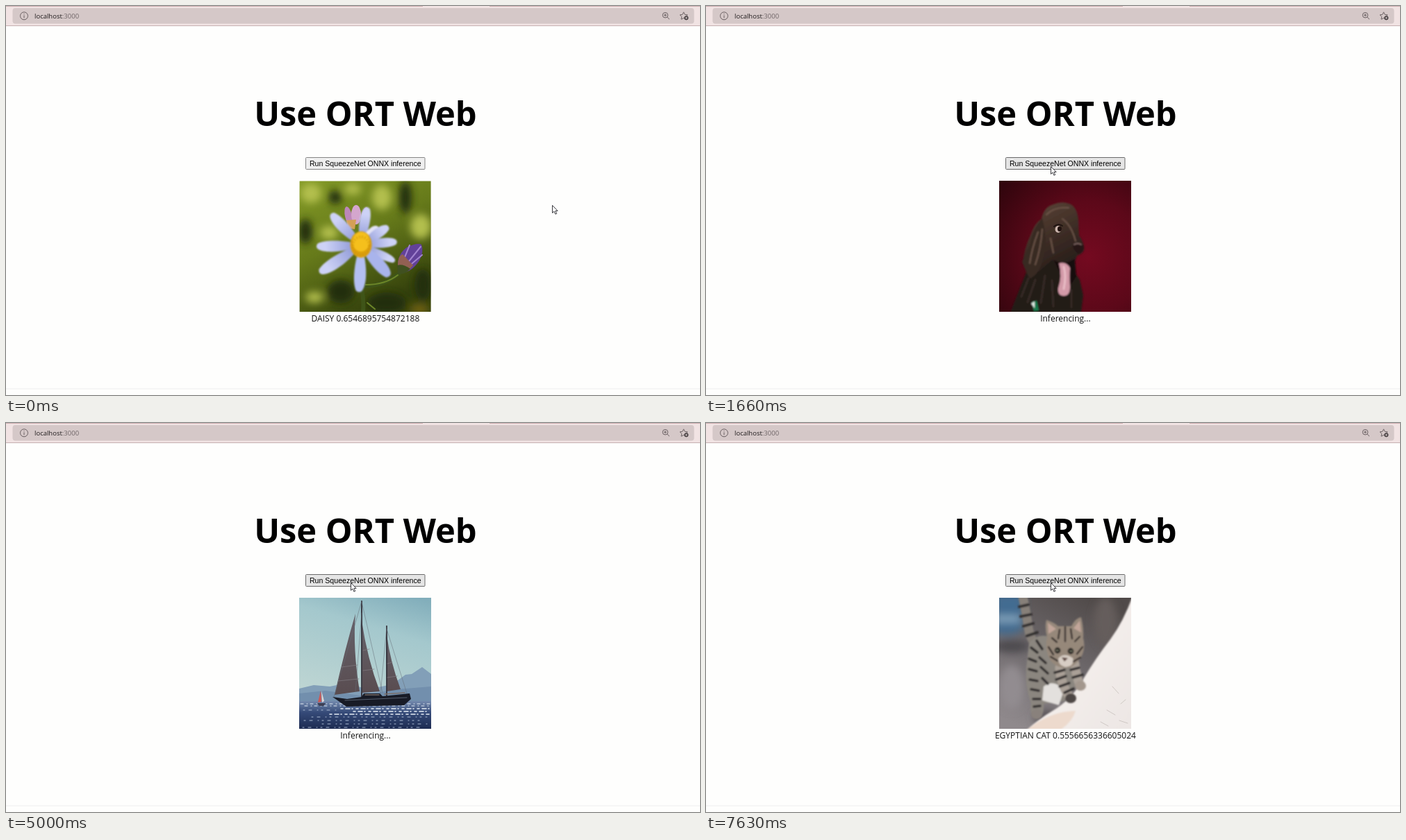
Recreate the animation shown at these times as an HTML page. Size 999 by 561 pixels, loop 8 s.

```html
<!DOCTYPE html>
<html lang="en">
<head>
<meta charset="utf-8">
<title>Use ORT Web</title>
<style>
html, body { margin: 0; width: 100%; height: 100%; overflow: hidden; background: #fefefd; }
svg { display: block; }
#stage { width: 100%; height: 100%; }
text { font-family: "Open Sans", "Noto Sans", sans-serif; }
.mid { text-anchor: middle; }
.address { font-size: 9.5px; fill: #201c1d; }
.port { fill: #6d6365; }
.icon { fill: none; stroke: #6b6163; stroke-width: 1; }
.title { font-size: 48.8px; font-weight: 700; }
.label { font: 10.6px "Liberation Sans", Arial, sans-serif; }
.status text { font-size: 12px; fill: #111; }

/* one 8 s clock for everything */
.button, .status text, .photo, .cursor { animation: 8s step-end infinite; }
.status text, .photo { opacity: 0; }

.button { animation-name: button; }
@keyframes button {
  0%, 100% { fill: #efefef; stroke: #858585; }
  4.96%, 12.5%, 62.5%, 87% { fill: #e5e5e5; stroke: #6a6a6a; }
  11.25%, 62%, 86.25% { fill: #f5f5f5; stroke: #8d8d8d; }
}

.cursor { animation-name: cursor; }
@keyframes cursor {
  0% { transform: translate(786px, 287px); }
  1.3% { transform: translate(786px, 287px); animation-timing-function: cubic-bezier(.35, .2, .4, 1); }
  5.375% { transform: translate(496px, 231px); }
  41.25%, 100% { transform: translate(496px, 230px); }
}

/* photos stack up, each covering the one before */
.photo.daisy { opacity: 1; animation: none; }
.photo.dog { animation-name: show-dog; }
.photo.boat { animation-name: show-boat; }
.photo.cello { animation-name: show-cello; }
.photo.cat { animation-name: show-cat; }
@keyframes show-dog { 0% { opacity: 0; } 20.75%, 100% { opacity: 1; } }
@keyframes show-boat { 0% { opacity: 0; } 45.75%, 100% { opacity: 1; } }
@keyframes show-cello { 0% { opacity: 0; } 69.125%, 100% { opacity: 1; } }
@keyframes show-cat { 0% { opacity: 0; } 89.125%, 100% { opacity: 1; } }

.status .busy { animation-name: say-busy; }
.status .daisy { animation-name: say-daisy; }
.status .dog { animation-name: say-dog; }
.status .boat { animation-name: say-boat; }
.status .cello { animation-name: say-cello; }
.status .cat { animation-name: say-cat; }
@keyframes say-busy {
  0%, 29.5%, 52.5%, 75.75%, 95.375%, 100% { opacity: 0; }
  12.5%, 42%, 62.5%, 87% { opacity: 1; }
}
@keyframes say-daisy { 0% { opacity: 1; } 12.5%, 100% { opacity: 0; } }
@keyframes say-dog { 0%, 42%, 100% { opacity: 0; } 29.5% { opacity: 1; } }
@keyframes say-boat { 0%, 62.5%, 100% { opacity: 0; } 52.5% { opacity: 1; } }
@keyframes say-cello { 0%, 87%, 100% { opacity: 0; } 75.75% { opacity: 1; } }
@keyframes say-cat { 0% { opacity: 0; } 95.375%, 100% { opacity: 1; } }

.line { fill: none; stroke-linecap: round; stroke-linejoin: round; }
</style>
</head>
<body>
<svg id="stage" viewBox="0 0 999 561">
  <defs>
    <filter id="soft"><feGaussianBlur stdDeviation="6"/></filter>
    <filter id="fuzz"><feGaussianBlur stdDeviation=".9"/></filter>
    <path id="petal" d="M0 0C14-7 40-10 49-3Q52 0 49 4C40 9 14 7 0 0"/>
    <linearGradient id="meadow" x1="0" y1="0" x2=".5" y2="1">
      <stop offset="0" stop-color="#839a26"/><stop offset=".5" stop-color="#667a1a"/><stop offset="1" stop-color="#35420c"/>
    </linearGradient>
    <linearGradient id="petals" x1="0" y1="0" x2="1" y2="0">
      <stop offset=".25" stop-color="#9aa3dc"/><stop offset=".8" stop-color="#cdd2f6"/>
    </linearGradient>
    <radialGradient id="wine" cx=".68" cy=".58" r=".85">
      <stop offset="0" stop-color="#740a20"/><stop offset=".5" stop-color="#5c0819"/><stop offset="1" stop-color="#31050d"/>
    </radialGradient>
    <linearGradient id="fur" x1="0" y1="0" x2=".4" y2="1">
      <stop offset="0" stop-color="#5f4638"/><stop offset=".5" stop-color="#402f27"/><stop offset="1" stop-color="#241b18"/>
    </linearGradient>
    <linearGradient id="sky" x1=".9" y1="0" x2=".6" y2="1">
      <stop offset="0" stop-color="#82aebb"/><stop offset=".3" stop-color="#a4c8cd"/><stop offset="1" stop-color="#c3d8d4"/>
    </linearGradient>
    <linearGradient id="sea" x1="0" y1="0" x2="0" y2="1">
      <stop offset="0" stop-color="#7389ad"/><stop offset=".4" stop-color="#354a78"/><stop offset="1" stop-color="#1c2a50"/>
    </linearGradient>
    <linearGradient id="sail" x1="0" y1="0" x2="0" y2="1">
      <stop offset="0" stop-color="#66636b"/><stop offset="1" stop-color="#594c50"/>
    </linearGradient>
    <radialGradient id="wood" cx=".4" cy=".35" r=".7">
      <stop offset="0" stop-color="#c2622a"/><stop offset=".6" stop-color="#a0441a"/><stop offset="1" stop-color="#622207"/>
    </radialGradient>
    <linearGradient id="yard" x1=".7" y1="0" x2=".2" y2="1">
      <stop offset="0" stop-color="#504a49"/><stop offset=".5" stop-color="#6f6a6d"/><stop offset="1" stop-color="#8f898c"/>
    </linearGradient>
    <linearGradient id="log" x1="0" y1="0" x2="1" y2="1">
      <stop offset="0" stop-color="#e6dbd5"/><stop offset=".5" stop-color="#f4eeeb"/><stop offset="1" stop-color="#ece6e4"/>
    </linearGradient>
  </defs>

  <rect width="999" height="561" fill="#fefefd"/>
  <rect width="999" height="28" fill="#f1e3e3"/>
  <path d="M0 .5H600M696 .5H999" stroke="#cfaeb0"/>
  <rect x="9.5" y="3" width="981" height="22.5" rx="4" fill="#d5c8c8"/>
  <path d="M0 28.5H999" stroke="#c5b0b1"/>
  <path d="M0 552H999" stroke="#eeeeee"/>

  <g class="icon">
    <circle cx="26" cy="14.3" r="5.5"/>
    <path d="M26 13.3V17.3M26 11V12"/>
    <circle cx="949" cy="13.2" r="3.8"/>
    <path d="M951.8 16L955 19.2M947 13.2H951M949 11.2V15.2"/>
    <path d="M975.5 8.8L977.2 12.3L981 12.8L978.3 15.6L978.9 19L975.5 17.4L972 19.2L972.7 15.4L970 12.8L973.8 12.3Z"/>
    <circle cx="979.3" cy="17.2" r="2.7" fill="#4f4749" stroke="#4f4749"/>
    <path d="M977.8 17.2H980.8M979.3 15.7V18.7" stroke="#e4dada" stroke-width=".8"/>
  </g>
  <text class="address" x="41" y="17.6">localhost<tspan class="port">:3000</tspan></text>

  <text class="title mid" x="517.4" y="172.5">Use ORT Web</text>
  <rect class="button" x="431.5" y="218.5" width="171.5" height="17" rx="1"/>
  <text class="label mid" x="517.3" y="230.6">Run SqueezeNet ONNX inference</text>

  <svg x="422.6" y="252.4" width="189" height="188.6" viewBox="422.6 252.4 189 188.6">
    <g class="photo daisy">
      <rect x="422" y="252" width="190" height="190" fill="url(#meadow)"/>
      <g filter="url(#soft)">
        <g fill="#b3bf4d">
          <ellipse cx="439" cy="270" rx="15" ry="14"/><ellipse cx="465" cy="327" rx="13" ry="10"/>
          <ellipse cx="541" cy="276" rx="14" ry="18"/><ellipse cx="597" cy="318" rx="15" ry="18"/>
          <ellipse cx="444" cy="420" rx="13" ry="8"/><ellipse cx="499" cy="264" rx="12" ry="8"/>
        </g>
        <g fill="#222d0a">
          <ellipse cx="431" cy="325" rx="10" ry="18"/><ellipse cx="575" cy="276" rx="9" ry="24"/>
          <ellipse cx="482" cy="412" rx="20" ry="17"/><ellipse cx="548" cy="428" rx="28" ry="15"/>
          <ellipse cx="600" cy="402" rx="12" ry="23"/><ellipse cx="474" cy="276" rx="10" ry="10"/>
        </g>
        <ellipse cx="595" cy="437" rx="14" ry="6" fill="#7d6818"/>
      </g>
      <path class="line" d="M507 391Q516 414 514 441M515 404Q550 404 575 377" stroke="#3f5418" stroke-width="6"/>
      <path class="line" d="M518 402Q546 402 564 388M520 428L531 437" stroke="#6c8628" stroke-width="2"/>
      <g fill="#bd87ba">
        <ellipse cx="493" cy="303" rx="5" ry="14" transform="rotate(-12 493 303)"/>
        <ellipse cx="504" cy="301" rx="7" ry="14" fill="#d4a6cd"/>
        <ellipse cx="516" cy="304" rx="5" ry="14" transform="rotate(12 516 304)"/>
        <path d="M490 309L504 308L502 322L492 320Z" fill="#d5a056"/>
      </g>
      <g fill="#624199">
        <path d="M564 375Q564 357 577 348Q592 341 598 344Q602 354 595 367Q584 384 569 385Z"/>
        <path d="M570 372L581 345M576 373L597 347M579 376L599 359" stroke="#a283cf" stroke-width="2" class="line"/>
        <path d="M564 374Q564 360 571 358L586 374Q575 388 565 385Z" fill="#926053"/>
        <path d="M563 374Q571 371 582 379Q574 388 564 386Z" fill="#405020"/>
      </g>
      <g fill="url(#petals)" filter="url(#fuzz)">
        <use href="#petal" transform="translate(511 345) rotate(226) scale(1.24 1.15)"/>
        <use href="#petal" transform="translate(511 345) rotate(-81) scale(1.1 1.1)"/>
        <use href="#petal" transform="translate(511 345) rotate(-48) scale(.72 1)" fill="#e3e3f4"/>
        <use href="#petal" transform="translate(511 345) rotate(-35) scale(.95 1.05)"/>
        <use href="#petal" transform="translate(511 345) rotate(-6) scale(1.03 1)"/>
        <use href="#petal" transform="translate(511 345) rotate(25) scale(1.07 .85)"/>
        <use href="#petal" transform="translate(511 345) rotate(47) scale(1.2 1.25)" fill="#a9b4ec"/>
        <use href="#petal" transform="translate(511 345) rotate(92) scale(1.34 1.25)" fill="#b3bff2"/>
        <use href="#petal" transform="translate(511 345) rotate(146) scale(1.42 1.25)"/>
        <use href="#petal" transform="translate(511 345) rotate(178) scale(1.27 1.15)"/>
      </g>
      <g filter="url(#fuzz)">
        <ellipse cx="511" cy="344" rx="15.5" ry="19" fill="#dda00d"/>
        <ellipse cx="511" cy="340" rx="12" ry="14" fill="#f5c01a"/>
        <ellipse cx="511" cy="346" rx="12" ry="13" fill="none" stroke="#c98f0c" stroke-width="4" stroke-dasharray="1 3"/>
      </g>
    </g>

    <g class="photo dog">
      <rect x="422" y="252" width="190" height="190" fill="url(#wine)"/>
      <g filter="url(#fuzz)">
        <path d="M438 442L449 414L461 384L480 362L515 361L538 395L543 417L540 442Z" fill="#241c19"/>
        <path d="M483 307Q486 290 500 286Q514 280 527 287Q535 294 536 308L537 331Q545 342 544 352Q541 358 534 360L530 371L532 397Q523 402 512 389L499 366L480 382L464 392L456 371Q458 349 467 331Q473 313 483 307Z" fill="url(#fur)"/>
        <path d="M484 306Q469 322 466 345L455 369L466 393Q480 387 485 365Q493 339 484 306Z" fill="#382a24"/>
        <path class="line" d="M490 301Q501 289 522 291M478 326Q469 350 466 371M484 322Q482 350 474 373M513 307Q526 316 532 339M496 335L500 356" stroke="#6d5548" stroke-width="2"/>
        <path class="line" d="M454 419L464 393M463 427L474 395M482 428L488 389M500 433L498 396M526 434L526 410" stroke="#352a25" stroke-width="3"/>
        <path d="M500 366Q514 375 531 365L533 390L525 402L514 394Z" fill="#180c0d"/>
        <path d="M508 371Q519 368 524 378Q523 389 524 405Q524 418 515 418Q506 418 507 407Q513 390 508 371Z" fill="#d39aa8"/>
        <path class="line" d="M515 376Q519 390 515 408" stroke="#e8bcc5" stroke-width="3"/>
        <path d="M528 345Q536 338 544 346Q545 355 536 357Q529 353 528 345Z" fill="#251817"/>
        <path class="line" d="M530 344Q535 341 540 344" stroke="#8e7370" stroke-width="1.5"/>
        <path d="M469 427L476 425L479 439L472 440Z" fill="#167c4d"/>
        <path d="M468 429L473 426L473 436Z" fill="#dee8e3"/>
      </g>
      <ellipse cx="507" cy="322" rx="4.5" ry="5" fill="#cbb5ad"/>
      <ellipse cx="509" cy="321.5" rx="3" ry="3.7" fill="#20120f"/>
      <path class="line" d="M501 318Q507 313 513 317" stroke="#211512" stroke-width="2"/>
    </g>

    <g class="photo boat">
      <rect x="422" y="252" width="190" height="190" fill="url(#sky)"/>
      <path d="M422 383L443 378L466 380L491 375L520 384L556 377L575 363L584 362L599 352L612 362V405H422Z" fill="#829fb8"/>
      <path d="M422 390L460 386L510 393L563 384L612 380V405H422Z" fill="#728fad"/>
      <rect x="422" y="401" width="190" height="41" fill="url(#sea)"/>
      <g class="line" stroke="#e5edf5">
        <path d="M424 405H612M430 408H610" stroke-dasharray="4 5 1 4"/>
        <path d="M482 412H612M500 416H609M466 420H609" stroke-width="1.6" stroke-dasharray="3 4 6 3 1 5"/>
        <path d="M428 414H480M440 424H606M429 429H595M455 434H608M427 439H600" stroke="#a9b9d2" stroke-dasharray="2 6 4 8 1 5"/>
      </g>
      <path d="M503 275Q488 326 473 392L509 387Q499 326 503 275Z" fill="url(#sail)"/>
      <path d="M512 285L513 389L538 387Q520 340 512 285Z" fill="url(#sail)"/>
      <path d="M548 305V387L568 384Q553 344 548 305Z" fill="url(#sail)"/>
      <path class="line" d="M512 257V401M548 293V398" stroke="#322f38" stroke-width="1.8"/>
      <path class="line" d="M512 257L472 395M512 258L542 389M512 274L503 387M548 294L539 391M548 297L578 393" stroke="#656c77" stroke-width=".5"/>
      <path class="line" d="M483 352L506 349M478 372L508 369M514 328L523 326M514 357L530 355M549 347L556 345M549 367L563 365" stroke="#817b81" stroke-width=".7"/>
      <path d="M470 395L491 398L512 395L515 390H538L542 394L581 390L583 398L573 407L490 409Z" fill="#181b26"/>
      <path class="line" d="M488 400L577 396" stroke="#687180" stroke-width=".8"/>
      <path class="line" d="M517 392H537M545 391L574 389" stroke="#786c67" stroke-width="1.5"/>
      <path d="M453 386L449 403L454 402Z" fill="#cf5653"/>
      <path d="M454 386L458 401L455 403Z" fill="#dfd9d8"/>
      <path d="M448 404H460L457 408H451Z" fill="#3d4054"/>
    </g>

    <g class="photo cello">
      <rect x="422" y="252" width="190" height="190" fill="#060505"/>
      <path class="line" d="M422 419L473 436L492 441" stroke="#7a6754" stroke-width="5"/>
      <path d="M498 441L515 426L546 433L541 442Z" fill="#5d4637"/>
      <g class="line" stroke="#55585a">
        <path d="M576 342L569 435M576 342Q591 337 612 340M572 365L611 363" stroke-width="1.5"/>
        <path d="M572 368L611 369" stroke="#9c9d9b" stroke-width="1"/>
        <path d="M600 371L606 438" stroke="#292b2c" stroke-width="3"/>
      </g>
      <path d="M445 292Q461 289 475 304Q481 322 496 326Q512 316 533 324Q554 332 556 357Q557 383 544 405Q531 428 508 436Q496 437 486 424Q480 409 464 413Q441 421 432 402Q423 375 428 341Q431 305 445 292Z" fill="#421607"/>
      <path d="M443 294Q460 291 473 307Q479 324 496 329Q512 319 529 327Q546 337 545 358Q544 389 530 409Q519 426 503 431Q493 430 486 418Q477 405 462 410Q442 416 434 398Q426 371 431 337Q434 307 443 294Z" fill="url(#wood)"/>
      <path d="M479 307Q496 307 502 319L494 328Q480 322 479 307Z" fill="#090504"/>
      <path d="M460 413Q472 403 485 420L487 429Q470 425 460 413Z" fill="#0e0604"/>
      <path class="line" d="M447 290L550 334" stroke="#d2bba2" stroke-width="3"/>
      <path class="line" d="M453 291L496 312" stroke="#f3ead9" stroke-width="1.5"/>
      <path class="line" d="M546 337Q560 362 544 397" stroke="#a64b1d" stroke-width="1"/>
      <path class="line" d="M468 329Q474 322 473 334Q473 345 481 349Q487 352 481 342M456 390Q458 384 463 392Q467 403 476 398" stroke="#220a03" stroke-width="3"/>
      <path d="M424 347L449 347L455 359L448 369L424 358Z" fill="#120a07"/>
      <path class="line" d="M440 350L472 360M443 359L470 367" stroke="#231109" stroke-width="3"/>
      <path d="M460 352L471 354L469 374L457 371Z" fill="#894019" stroke="#251006" stroke-width="2"/>
      <path d="M477 359L611 402V416L474 376Z" fill="#211a17"/>
      <path class="line" d="M443 352L608 404M446 355L607 407M447 358L606 409M447 362L605 412" stroke="#b6aaa0" stroke-width=".7"/>
      <path class="line" d="M597 402L609 409M595 411L605 416" stroke="#725b4a" stroke-width="2"/>
    </g>

    <g class="photo cat">
      <rect x="422" y="252" width="190" height="190" fill="url(#yard)"/>
      <g filter="url(#soft)">
        <path d="M415 245H457V298Q438 310 415 303Z" fill="#426c91"/>
        <path d="M415 278H452V287H415Z" fill="#86a7bf"/>
        <ellipse cx="440" cy="322" rx="27" ry="9" fill="#4b494d"/>
        <ellipse cx="575" cy="287" rx="17" ry="36" fill="#655d5b"/>
        <ellipse cx="440" cy="381" rx="18" ry="32" fill="#928c90"/>
        <ellipse cx="490" cy="425" rx="18" ry="12" fill="#5a5558"/>
      </g>
      <g filter="url(#fuzz)">
        <path d="M614 250Q601 286 582 312Q561 339 542 371Q526 399 499 415Q480 426 460 444H614Z" fill="url(#log)"/>
        <path d="M463 442Q494 416 532 415Q528 430 511 442Z" fill="#eddacd"/>
      </g>
      <path class="line" d="M585 380L594 390M597 405L604 399M577 414L589 421M595 429L607 433M568 431L579 437" stroke="#c2bab6" stroke-width=".7"/>
      <g filter="url(#fuzz)">
        <path class="line" d="M456 250Q462 279 464 295T478 325" stroke="#878079" stroke-width="13"/>
        <path class="line" d="M451 265L464 262M453 279L468 276M457 293L471 289M462 307L477 302" stroke="#343132" stroke-width="4"/>
        <path d="M465 318Q477 302 496 309L533 341L541 365L516 401L486 405Q487 427 475 427Q465 421 468 404Q459 381 461 353Z" fill="#8b867f"/>
        <path d="M486 380Q502 368 515 386L508 407L484 400Z" fill="#e3e0dd"/>
        <path class="line" d="M509 353Q511 380 525 397M531 347Q533 367 539 379" stroke="#aaa097" stroke-width="13"/>
        <path class="line" d="M468 324L477 331M476 314L484 326M465 340L475 344M480 338L489 346M465 355L476 358M482 352L492 361M466 370L477 372M484 368L492 376M468 384L479 386M471 398L481 398M472 409L481 408M502 360L516 356M504 370L518 365M509 380L523 375M516 389L529 383M525 356L537 353M528 367L542 363" stroke="#302d2e" stroke-width="3.6"/>
        <ellipse cx="525" cy="397" rx="8" ry="7" fill="#4d4745"/>
        <ellipse cx="539" cy="379" rx="8" ry="7" fill="#a3978d"/>
        <ellipse cx="476" cy="420" rx="8" ry="7" fill="#89817b"/>
        <path d="M491 309Q487 294 490 284Q500 287 507 293H526Q532 281 540 280Q544 296 543 310Q548 329 536 343Q526 355 514 353Q497 350 492 334Q488 322 491 309Z" fill="#96887a"/>
        <path d="M493 304L492 288L504 297ZM529 296L538 285L540 302Z" fill="#c2a69a"/>
        <path d="M507 340Q515 330 528 339Q531 351 517 352Q507 349 507 340Z" fill="#d7cdc4"/>
        <path class="line" d="M509 298L507 311M517 294L517 315M525 297L527 311M498 310L505 316M538 308L531 315M493 323L500 334M542 323L534 333M496 337L506 343M539 338L529 344" stroke="#332c29" stroke-width="2.4"/>
        <circle cx="506" cy="328" r="4.4" fill="#262321"/><circle cx="525" cy="329" r="4.4" fill="#262321"/>
        <path class="line" d="M504 328H507M524 329H527" stroke="#6d705f" stroke-width="2"/>
        <path d="M512 338L521 339L516 344Z" fill="#5b423d"/>
      </g>
    </g>
  </svg>

  <g class="status mid">
    <text class="daisy" x="517.4" y="454.5">DAISY 0.6546895754872188</text>
    <text class="busy" x="517.4" y="454.5">Inferencing...</text>
    <text class="dog" x="517.4" y="454.5">SUSSEX SPANIEL 0.4127360582351685</text>
    <text class="boat" x="517.4" y="454.5">SCHOONER 0.837514638900757</text>
    <text class="cello" x="517.4" y="454.5">CELLO 0.97248148918151855</text>
    <text class="cat" x="517.4" y="454.5">EGYPTIAN CAT 0.5556656336605024</text>
  </g>

  <path class="cursor" d="M.5 .5V11.4L3 9.1L4.9 13.2L6.7 12.4L4.9 8.4H8.1Z" fill="#fff" stroke="#25252b" stroke-width=".9"/>
</svg>
</body>
</html>
```
